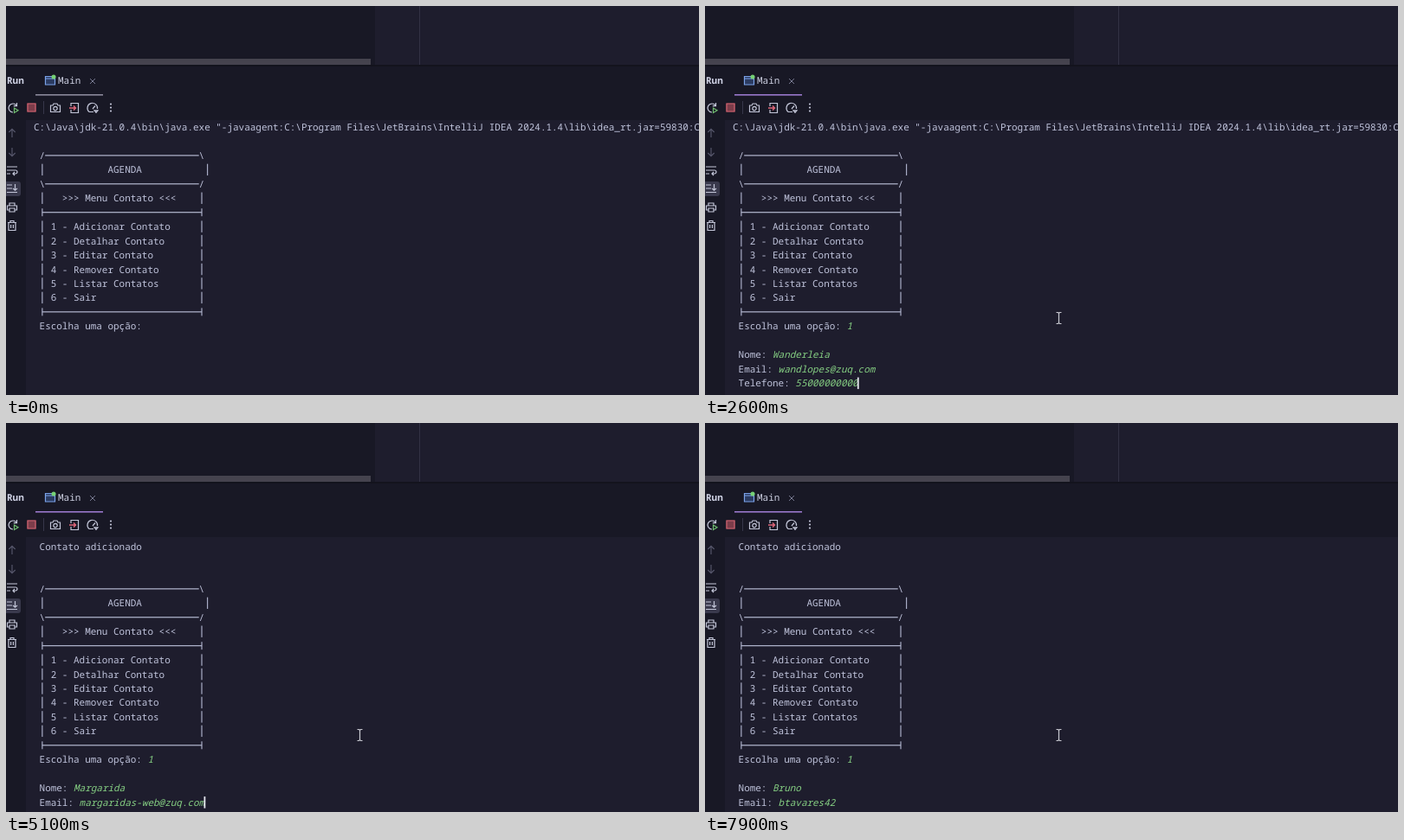
Recreate the animation shown at these times as an HTML page with a canvas. Size 800x450 px, loop 8 s.

```html
<!DOCTYPE html>
<html lang="pt">
<head>
<meta charset="utf-8">
<title>Agenda</title>
<style>
html, body { margin: 0; width: 100%; height: 100%; overflow: hidden; background: #181825; }
canvas { display: block; }
</style>
</head>
<body>
<canvas id="stage" width="800" height="450"></canvas>
<script>
const ctx = document.getElementById('stage').getContext('2d');
const LOOP = 8000, STEP = 100;
const CHAR = 6.576, ROW = 16.45, LEFT = 32, TOP = 140, BOTTOM = 438.6;
const TEXT = '#c0c4dc', GREEN = '#86d083', ICON = '#c3c6d8', DIM = '#55566a';
const FONT = '10.96px "Noto Sans Mono", "DejaVu Sans Mono", monospace';

const command = String.raw`C:\Java\jdk-21.0.4\bin\java.exe "-javaagent:C:\Program Files\JetBrains\IntelliJ IDEA 2024.1.4\lib\idea_rt.jar=59830:C:\Program Files`;
const line = '─'.repeat(27);
const options = ['Adicionar Contato', 'Detalhar Contato', 'Editar Contato',
  'Remover Contato', 'Listar Contatos', 'Sair'];
const menu = [
  ` /${line}\\`,
  ` │${' '.repeat(11)}AGENDA${' '.repeat(11)}│`,
  ` \\${line}/`,
  ' │   >>> Menu Contato <<<    │',
  ` ├${line}┤`,
  ...options.map((o, i) => ` │ ${i + 1} - ${o}`.padEnd(29) + '│'),
  ` ├${line}┤`
];

// Each field: label, typed value, time the label appears, time typing ends
const sessions = [
  { shown: 0, choice: 300, fields: [
    ['Nome', 'Wanderleia', 400, 800],
    ['Email', 'wandlopes@zuq.com', 900, 1600],
    ['Telefone', '55000000000', 1700, 2600]] },
  { shown: 2800, choice: 2900, fields: [
    ['Nome', 'Margarida', 3000, 3700],
    ['Email', 'margaridas-web@zuq.com', 3800, 5000],
    ['Telefone', '55000000000', 5200, 5900]] },
  { shown: 6100, choice: 6200, fields: [
    ['Nome', 'Bruno', 6300, 6700],
    ['Email', 'btavares42', 6900, 7900]] }
];

function consoleRows(t) {
  const rows = [[command], ['']];
  sessions.forEach((s, n) => {
    if (t < s.shown) return;
    if (n) rows.push([''], [' Contato adicionado'], [''], ['']);
    rows.push(...menu.map(m => [m]));
    rows.push([' Escolha uma opção: ', t >= s.choice ? '1' : '']);
    s.fields.forEach(([label, value, from, to], i) => {
      if (t < from) return;
      if (!i) rows.push(['']);
      const part = Math.min(1, (t - from) / (to - from));
      rows.push([` ${label}: `, value.slice(0, Math.round(part * value.length))]);
    });
  });
  return rows;
}

function rect(x, y, w, h, color) {
  ctx.fillStyle = color;
  ctx.fillRect(x, y, w, h);
}

function text(s, x, y, color = TEXT, style = '500') {
  ctx.font = `${style} ${FONT}`;
  ctx.fillStyle = color;
  ctx.fillText(s, x, y + 4);
}

function icon(x, y, path, color = ICON, width = 1.2) {
  ctx.save();
  ctx.translate(x, y);
  ctx.strokeStyle = color;
  ctx.lineWidth = width;
  ctx.stroke(new Path2D(path));
  ctx.restore();
}

function dot(x, y, r, color) {
  ctx.fillStyle = color;
  ctx.beginPath();
  ctx.arc(x, y, r, 0, 7);
  ctx.fill();
}

function consoleRow([fixed, typed = ''], y) {
  text(fixed.replace(/[│├┤─]/g, ' '), LEFT, y);
  const mid = i => LEFT + (i + .5) * CHAR;
  [...fixed].forEach((c, i) => {
    if (c === '│') rect(mid(i) - .6, y - 6.7, 1.2, 13.4, '#a9adc6');
    if ('├┤'.includes(c)) rect(mid(i) - .6, y - 4.5, 1.2, 9, '#a9adc6');
  });
  const start = fixed.indexOf('─');
  if (start > 0) {
    const pad = fixed.includes('├') ? CHAR / 2 : 0;
    rect(LEFT + start * CHAR - pad, y - .6, 27 * CHAR + 2 * pad, 1.2, '#b4b8d0');
  }
  text(typed, LEFT + fixed.length * CHAR, y, GREEN, 'italic 500');
}

function frameParts(active) {
  rect(0, 0, 800, 450, '#181825');
  rect(426, 0, 374, 68, '#1e1d2d');
  rect(477, 0, 1, 68, '#323143');
  rect(0, 61, 421, 7, '#45434e');
  rect(0, 68, 800, 2, '#13131d');
  rect(23, 132, 777, 318, '#1e1d2d');

  text('Run', 1, 86, '#d0d3e6', 'bold');
  text('Main', 60, 86, '#cdd0e2');
  icon(100, 87, 'M-3-3L3 3M3-3L-3 3', '#777990', 1);
  rect(34, 102, 78, 1.6, active ? '#9a78cc' : '#8b899b');

  ctx.fillStyle = '#2b3b61';
  ctx.fillRect(45.5, 81.5, 11, 9.5);
  icon(51, 86, 'M-5.5-4.5H5.5V5H-5.5ZM-5.5-2H5.5', '#7ba2e8');
  dot(55, 82, 2.5, '#76d275');
}

function toolbar() {
  icon(8, 118, 'M4.2-2.8A5 5 0 1 0 0 5M4.5-6V-2.3H.8');
  icon(8, 118, 'M1.5 0L6 2.7L1.5 5.4Z', '#70bd70');
  rect(24.5, 112.5, 10, 10, '#7c3d4a');
  icon(29.5, 117.5, 'M-4.5-4.5H4.5V4.5H-4.5Z', '#cf6371');
  rect(43, 110, 1, 15, '#37374a');
  icon(57, 118, 'M-5.5-3H-3L-2-5H2L3-3H5.5V4.5H-5.5ZM2.2 .6A2.2 2.2 0 1 1-2.2 .6A2.2 2.2 0 1 1 2.2 .6');
  icon(79, 118, 'M-4-2V-5.5H4.5V5.5H-4V2');
  icon(79, 118, 'M-6 0H1.5M-1-2.5L1.5 0L-1 2.5', '#e0677a', 1.4);
  icon(100, 118, 'M-4 4.5A5.8 5.8 0 1 1 5.5 1M-4 4.5H1M0 1L3-2.5');
  icon(103.5, 122, 'M-1.5-1.2H2.5L.5 1.2Z');
  [-4, 0, 4].forEach(d => dot(121, 117.5 + d, 1.1, ICON));
}

function sidebar() {
  icon(7, 147, 'M0 5V-4.5M-3.7-1L0-4.7L3.7-1', DIM);
  icon(7, 169, 'M0-5V4.5M-3.7 1L0 4.7L3.7 1', DIM);
  icon(7, 190, 'M-6-4H6M-6 0H4A2 2 0 0 1 4 4H1M3 2L1 4L3 6M-6 4H-2');
  ctx.fillStyle = '#39394c';
  ctx.beginPath();
  ctx.roundRect(-3, 203, 20, 17, 3);
  ctx.fill();
  icon(7, 211, 'M-6-4H0M-6 0H0M-6 4.5H6M3.5-5V2M1 0L3.5 2.3L6 0');
  icon(7, 233, 'M-3-2V-5H3V-2M-3 3H-5.5V-2H5.5V3H3M-3 1H3V5H-3Z');
  icon(7, 254, 'M-5-3.5H5M-2-3.5V-5.5H2V-3.5M-4-3.5V5.5H4V-3.5M-1.4-1V3M1.4-1V3');
}

function draw(now) {
  const step = Math.floor(now % LOOP / STEP), t = step * STEP;
  const active = t >= 200;
  frameParts(active);
  toolbar();
  sidebar();

  const rows = consoleRows(t), last = rows.length - 1;
  const top = Math.min(TOP, BOTTOM - last * ROW);
  ctx.save();
  ctx.beginPath();
  ctx.rect(23, 132, 777, 318);
  ctx.clip();
  rows.forEach((row, i) => {
    const y = top + i * ROW;
    if (y > 130) consoleRow(row, y);
  });
  if (active && step % 18 !== 7) {
    rect(LEFT + rows[last].join('').length * CHAR - .8, top + last * ROW - 6.5, 1.8, 13.5, '#e4e5ee');
  }
  ctx.restore();

  if (active) icon(408.5, 361, 'M-3-6.5H-1L0-5.5L1-6.5H3M0-5.5V5.5M-3 6.5H-1L0 5.5L1 6.5H3', '#c9cad2');
  requestAnimationFrame(draw);
}

ctx.textRendering = 'geometricPrecision';
requestAnimationFrame(draw);
</script>
</body>
</html>
```
